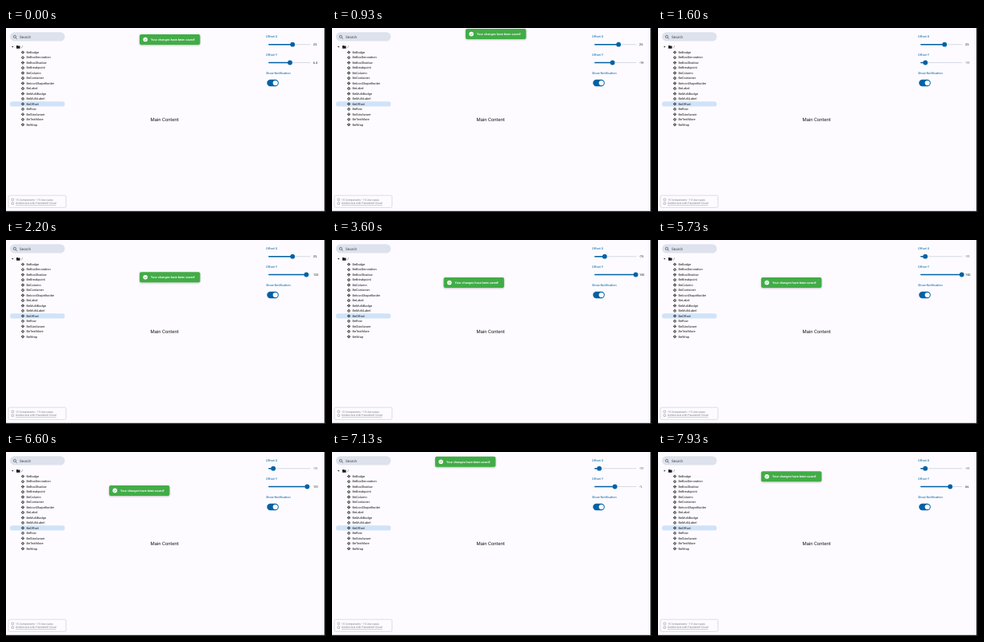
Animation, 400 px wide and 231 px high, one loop 8000 ms. Source, as an HTML page:

```html
<!DOCTYPE html>
<html lang="en">
<head>
<meta charset="utf-8">
<title>Offset demo</title>
<style>
  html, body { margin: 0; width: 100%; height: 100%; overflow: hidden; background: #fdfbff; }
  svg { display: block; width: 100vw; height: 100vh; }
  text { font-family: Roboto, Inter, sans-serif; text-rendering: geometricPrecision; }
</style>
</head>
<body>
<svg id="stage" viewBox="0 0 400 231" preserveAspectRatio="none">
  <defs>
    <filter id="shadow" x="-10%" y="-40%" width="120%" height="190%">
      <feDropShadow dx="0" dy="0.7" stdDeviation="0.9" flood-color="#000" flood-opacity="0.28"/>
    </filter>
  </defs>
</svg>
<script>
const LOOP = 8000, STEP = 1000 / 15;
const BLUE = '#0061a4', INK = '#1b1b1f', GREY = '#74777f', GREEN = '#42ac46';
const stage = document.getElementById('stage');

function add(tag, attrs, parent = stage) {
  const el = document.createElementNS('http://www.w3.org/2000/svg', tag);
  for (const k in attrs) el.setAttribute(k, attrs[k]);
  return parent.appendChild(el);
}
const rect = (x, y, width, height, rx, fill, parent) =>
  add('rect', { x, y, width, height, rx, fill }, parent);
const circle = (cx, cy, r, fill, parent) => add('circle', { cx, cy, r, fill }, parent);
const path = (d, attrs, parent) => add('path', { d, ...attrs }, parent);
function label(str, x, y, size, fill, attrs = {}, parent) {
  const el = add('text', { x, y, 'font-size': size, fill, ...attrs }, parent);
  el.textContent = str;
  return el;
}

// Search field
rect(5, 5.2, 68.5, 11.4, 5.7, '#dde2ec');
path('M12.2 12.2l1.5 1.5', { stroke: '#44474e', 'stroke-width': 0.7 });
add('circle', { cx: 10.9, cy: 10.8, r: 1.6, fill: 'none', stroke: '#44474e', 'stroke-width': 0.65 });
label('Search', 17, 12.7, 4.6, '#44474e');

// Component tree
path('M7 23h2.4l-1.2 1.4z', { fill: INK });
path('M13 22h1.7l.6.6h2.2v3.2h-4.5z', { fill: INK });
label('/', 19.3, 25.3, 4, INK);
rect(5, 92.2, 68.5, 6.4, 3.2, '#d0e3f8');
const names = ['Badge', 'BoxDecoration', 'BoxShadow', 'Breakpoint', 'Column', 'Container',
  'IconShapeBorder', 'Label', 'MultiBadge', 'MultiLabel', 'Offset', 'Row', 'SizeAware',
  'TextMore', 'Wrap'];
names.forEach((name, i) => {
  const y = 30.6 + i * 6.48;
  for (const [dx, dy] of [[0, -1.2], [1.2, 0], [0, 1.2], [-1.2, 0]]) {
    path(`M${21 + dx} ${y + dy - 0.95}l.95 .95l-.95 .95l-.95-.95z`, { fill: INK });
  }
  label('Be' + name, 25.5, y + 1.3, 3.95, INK);
});

// Footer card
add('rect', { x: 3, y: 210.2, width: 72, height: 15.2, rx: 1.6, fill: 'none', stroke: '#c6c8d0', 'stroke-width': 0.6 });
for (const y of [214.2, 218.9]) {
  add('rect', { x: 7, y, width: 2.6, height: 2.6, rx: 0.4, fill: 'none', stroke: GREY, 'stroke-width': 0.45 });
}
label('15 Components • 15 Use-cases', 12, 216.7, 3.4, GREY);
label('Golden test with Panelshelf Cloud', 12, 221.4, 3.4, GREY, { 'text-decoration': 'underline' });

label('Main Content', 198.2, 116.8, 5.95, INK, { 'text-anchor': 'middle' });

// Knobs
const title = (str, y) => label(str, 325, y, 3.9, BLUE);
function slider(name, y) {
  title(name, y - 8.4);
  rect(328, y - 0.45, 52.5, 0.9, 0.45, '#d6dae4');
  const fill = rect(328, y - 0.75, 1, 1.5, 0.75, BLUE);
  const knob = circle(0, y, 2.9, BLUE);
  const value = label('', 384, y + 1.4, 3.9, INK);
  return v => {
    const x = 353.9 + v * 0.172;
    fill.setAttribute('width', x - 328);
    knob.setAttribute('cx', x);
    value.textContent = v.toFixed(1).slice(0, 3);
  };
}
const setX = slider('Offset X', 20.7);
const setY = slider('Offset Y', 43.5);
title('Show Notification', 57.9);
rect(326.2, 64.8, 14.6, 8.4, 4.2, BLUE);
circle(336.7, 69, 3.1, '#fff');

// Notification
const toast = add('g', {});
rect(0, 0, 75.6, 13, 2, GREEN, toast).setAttribute('filter', 'url(#shadow)');
circle(7.2, 6.5, 2.8, '#fff', toast);
path('M5.8 6.6l1 1l1.9-2', { fill: 'none', stroke: GREEN, 'stroke-width': 0.7 }, toast);
label('Your changes have been saved!', 14, 7.9, 3.9, '#fff', { 'font-weight': 500 }, toast);

// Window edge
rect(398, 0, 2, 231, 0, '#1c1c1f');
rect(0, 229.8, 400, 1.2, 0, '#1c1c1f');

// [time, value] keys of the two drags
const keysX = [[0, 25], [2930, 25], [3600, -75.9], [3800, -92], [4530, -115], [LOOP, -115]];
const keysY = [[0, 6.4], [800, 6.4], [1330, -95], [1470, -112], [1600, -114.5], [1930, 0],
  [2070, 60], [2200, 125.4], [2400, 150], [6270, 150], [6600, 131.3], [6667, 97],
  [6800, 97], [7330, -60], [7400, -60], [7930, 66], [LOOP, 66]];

function at(keys, t) {
  const i = keys.findIndex(k => k[0] > t);
  const [t0, a] = keys[i - 1], [t1, b] = keys[i];
  return a + (b - a) * (t - t0) / (t1 - t0);
}

const start = performance.now();
function draw(now) {
  const time = Math.max(0, now - start) % LOOP;
  const t = Math.min(119, Math.floor((time + 4) / STEP)) * STEP;
  const x = at(keysX, t), y = at(keysY, t);
  setX(x);
  setY(y);
  toast.setAttribute('transform', `translate(${167 + (x - 25) * 0.272} ${8 + (y - 6.4) * 0.2716})`);
  requestAnimationFrame(draw);
}
draw(start);
</script>
</body>
</html>
```
